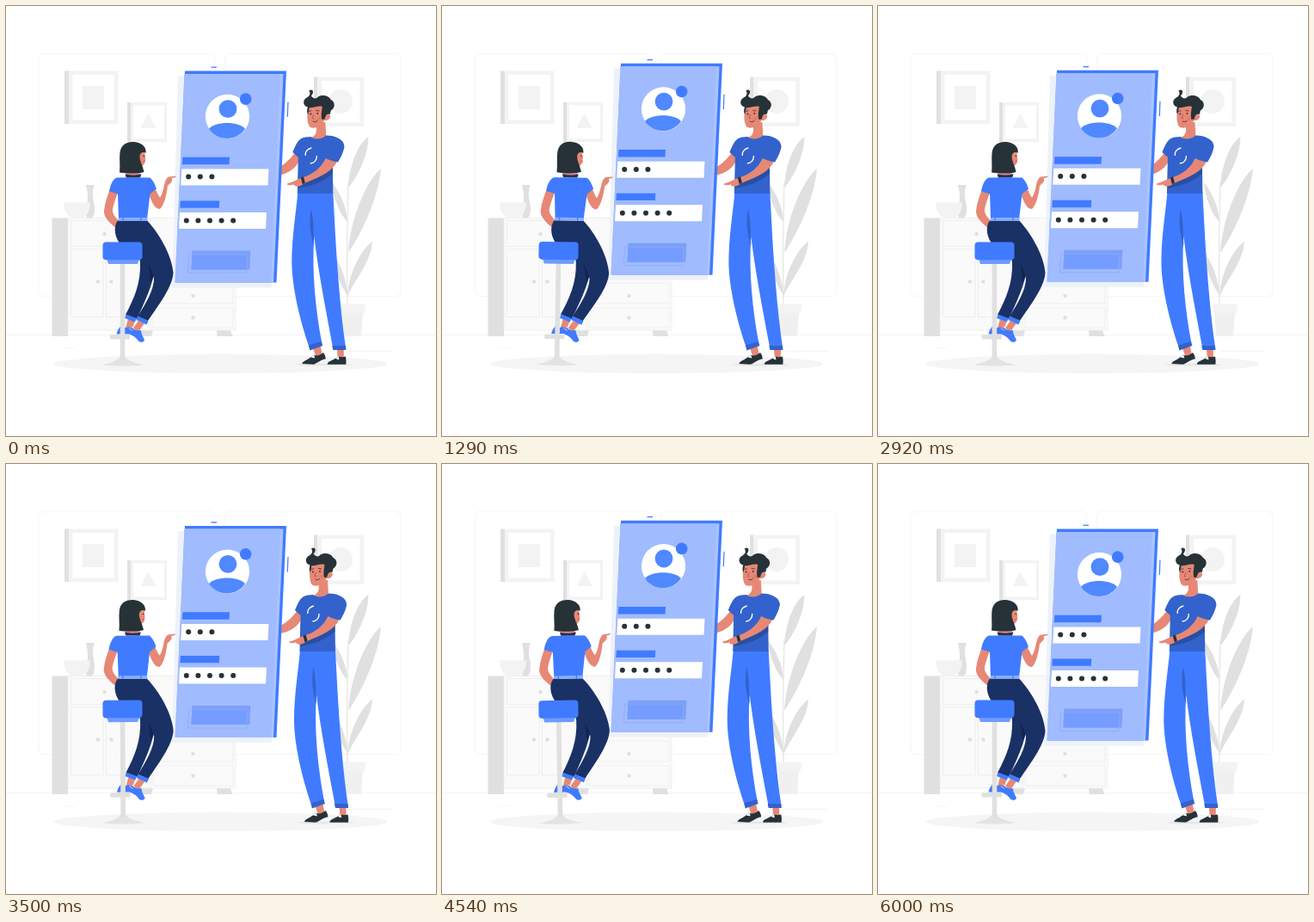
Recreate the animation shown at these times as an HTML page. Size 500 px wide and 500 px high, loop 6040 ms.

```html
<!DOCTYPE html>
<html lang="en">
<head>
<meta charset="utf-8">
<title>Login illustration</title>
<style>
  html, body { margin: 0; width: 100%; height: 100%; overflow: hidden; background: #fff; }
  svg { display: block; width: 100vw; height: 100vh; }
  .blue { fill: #407bff; }
  .deep { fill: #3362cc; }
  .navy { fill: #1a3166; }
  .ink { fill: #263238; }
  .skin { fill: #e68875; }
  .g1 { fill: #fafafa; }
  .g2 { fill: #f3f3f3; }
  .g3 { fill: #e0e0e0; }
  .white { fill: #fff; }
  .line { fill: none; stroke: #ebebeb; stroke-width: .8; }
  .thin { fill: none; stroke: #efefef; stroke-width: .6; }
</style>
</head>
<body>
<svg viewBox="0 0 500 500" xmlns="http://www.w3.org/2000/svg">
  <g id="room">
    <rect class="thin" x="38.4" y="55.2" width="204.2" height="282.4" rx="5.5"/>
    <rect class="thin" x="254.6" y="55.2" width="204.2" height="282.4" rx="5.5"/>
    <path class="thin" d="M0 382.5H500M65 398H80M398 401.5H450"/>

    <path class="g3" d="M68 75.500h5v61.500h-5zM141 112h4v46h-4zM358 82.500h4.500v57.500h-4.500z"/>
    <path class="g2" d="M73 75.500h57.500v61.500h-57.500zM145 112h42v46h-42zM362.500 82.500h53.500v57.500h-53.500z"/>
    <path class="white" d="M77.500 80h48.500v52.500h-48.500zM148 115.500h36v39h-36zM367 87h44.500v48.500h-44.500z"/>
    <path class="g2" d="M89 93h25v27h-25zM165.500 125l9 17h-18z"/>
    <circle class="g2" cx="389" cy="111" r="14"/>

    <path class="g1" d="M72 246.500H267V377H72z"/>
    <path class="g3" d="M53.500 246.500H72V384H53.500zM245 377h16l2.500 7h-18zM155 377h16l-2 7h-14z"/>
    <path class="line" d="M72 246.500H267V377H72zM75.500 249.500H155V279.500H75.500zM75.500 283H113V361.500H75.500zM116.500 283H155V361.500H116.500zM171 322H264V346H171zM171 351H264V374H171zM168 246V377"/>
    <g class="g3">
      <circle cx="114.500" cy="265" r="2.2"/><circle cx="107" cy="320.500" r="2.200"/>
      <circle cx="122.500" cy="320.500" r="2.200"/><circle cx="217.500" cy="337" r="2.200"/>
      <circle cx="217.500" cy="362.500" r="2.200"/>
    </g>
    <path class="g3" d="M93 208h9.500C100 218 101 222 102.500 230C104 240 102 246 99 246.500H94C92 240 94 232 95 225C95.500 218 94 213 93 208z"/>
    <path class="g2" d="M67 228.500H98C98 240 92 246.800 86 246.800H79C73 246.800 67 240 67 228.500z"/>

    <path d="M397 348C396 300 397 250 398 205M397 335C390 320 386 305 381 292" fill="none" stroke="#e0e0e0"/>
    <path class="g3" d="M421.500 152C409 160 399 186 398 211C406 203 421 177 421.500 152zM436 189C419 203 400 248 398 287C411 268 433 226 436 189zM426 273.500C412 284 398 312 397 338C404 320 425 298 426 273.500zM379 205C387 215 397 234 397 251C389 243 380 223 379 205zM378 284C387 296 396 316 397 336C388 324 380 303 378 284z"/>
    <path fill="#f0f0f0" d="M391 357h24l-2 27h-20z"/>
    <path class="g2" d="M389 346.500h29.500l-1.500 10.500h-27z"/>
    <ellipse cx="249.500" cy="416" rx="194" ry="11" fill="#f5f5f5"/>
  </g>

  <g id="man">
    <ellipse cx="369" cy="417" rx="33.500" ry="1.300" fill="#e6e6e6"/>
    <path class="skin" d="M336 170L342 178C337 188 329 195 316 197V188C324 184 330 178 336 170z"/>
    <path class="skin" d="M356 396l9-3 2.500 13-7 3zM384.500 398h8v12h-7z"/>
    <path class="ink" d="M344 416C344 413 351 412 357 405.500C361 407.500 365 406 368.500 403C370.500 405 371.500 408 371.300 410.500C366 411 362 415.500 357 416.800zM373.500 416C374 413 380 412.500 386 407.500C389 408.500 392 408.500 394.500 407.500C395.500 411 395.300 414 395 416.800H373.500z"/>
    <path class="white" d="M354 408.500l3.500-3.500 1.500 4.500zM383 410l3.500-3 .5 4.500z"/>
    <path class="blue" d="M339 216.500H380C382 250 385 330 395 398.500H380C371 350 363 310 358 268C355 310 360 355 367 392L353 398.500C341 365 332 325 332 297C332 268 337 240 339 216.500z"/>
    <path class="deep" d="M354.500 236C358 250 357 264 358 279C353 265 352 249 354.500 236zM351.500 394.500L366.500 390L368 395L353 400.500zM379 395h15.500l.5 5H380z"/>

    <path class="skin" d="M360 136L371 135L372 151C369 157 358 157 354 153C360 151 362 147 360 136z"/>
    <path class="deep" d="M354 152C359 156 367 155 372 150.500C383 150.500 393 155 393 164C392 170 389 176 386 181L379.500 181L380 218H338.500L339.500 176L333 170C337 161 339 154 348 152.500z"/>
    <path d="M340 206C355 203 370 197 379.500 187V195C368 205 355 209 339.500 212z" fill="#294ea3"/>
    <path d="M348 174C347 170 350 166 355 165M361 174C361.500 179 358 183 353.500 183" fill="none" stroke="#fff" stroke-width="1.300"/>
    <path class="skin" d="M372 176L384.500 181C379 192 367 198 347 206L343 200C356 196 366 189 372 176z"/>
    <path class="skin" d="M345 199.500C338 201 334 205 326.500 206.500C326 208.500 330 209 334 207.500C336 210.500 341 211 346 206.500z"/>
    <path class="ink" d="M342.500 200l3-1.800 2 7-3 2z"/>
    <path class="deep" d="M372 157C386 151 393 157 393 164C391 171 388 177 385.500 181.500C380 181 375 179 370.500 176.500z"/>

    <path class="skin" d="M352 116C349.500 125 349.500 132 351.500 138C353 143 360 142.500 364 139.500C367 137.500 369 135 370 133C374 134 378 130 376.500 127C375 125 372 126 371 128L369 116z"/>
    <path class="ink" d="M352 98.500C356 95.500 359 100 354.500 104.500C357 107.500 360 108.500 362 106C367 102.500 375 104 377.500 109C382.500 111 383 118.500 377.500 121.500L376.500 126C373 125 371 127 370.500 131.500L367 132C365.500 127 367 122 367.500 117C362 115.500 358 119 352.500 118L351 126C349 123 350 120 350.500 117.500C345 116.500 344 109 349.500 106.500C351.500 105.500 355 102.500 352 98.500z"/>
    <g class="ink"><circle cx="354" cy="125.500" r=".9"/><circle cx="362" cy="125" r=".9"/></g>
    <path d="M352 122.500l3-.8M360 121.500l4 .5M356.500 134c2 1.200 4 .8 5.500-1" fill="none" stroke="#263238" stroke-width=".8"/>
    <path d="M357.500 126l-1.800 4.500 2 .3" fill="none" stroke="#b3493b" stroke-width=".8"/>
    <circle cx="364" cy="131" r="2" fill="#de7460" opacity=".6"/>
  </g>

  <g id="phone">
    <path d="M200 81H320L309 327H193z" fill="#edf2fa"/>
    <path class="blue" d="M208 75H326L314.500 321H197z"/>
    <path fill="#aac3ff" d="M207.500 78.500H322.500L311 321H196.500z"/>
    <path fill="#a0bbfe" d="M207.500 78.500H319L308 321H196.500z"/>
    <path d="M238.500 70.800H245" stroke="#407bff" stroke-width="1.300"/>
    <path d="M328 111L327.300 128.500" stroke="#407bff" stroke-width="1.200"/>
    <circle class="white" cx="257.500" cy="128" r="25.600"/>
    <g fill="#5088ff">
      <circle cx="258" cy="119.300" r="10.400"/>
      <path d="M236 142.300C243 133.300 271 133.300 278 142.300C268 157.300 246 157.300 236 142.300z"/>
    </g>
    <circle class="blue" cx="278.700" cy="107.700" r="6.800"/>
    <path class="blue" d="M205.300 175.300H260L259.500 183.800H204.800zM202.800 226H248.300L247.800 234.300H202.300z"/>
    <path class="white" d="M204.300 189H305.500L304.500 208H203.300zM202 239.500H303L302 258.500H201z"/>
    <g id="dots" class="ink"></g>
    <path fill="#7c9ff8" d="M216.500 284H284.300L283.300 306H215.500z"/>
    <path fill="#759dff" d="M216.300 288.500H280.800L280 306H215.500z"/>
    <path d="M212.500 288.500H281L280 310H211.500z" fill="none" stroke="#8dabf5" stroke-width=".8"/>
  </g>

  <g id="woman">
    <path fill="#e3e3e3" d="M111 417C124 415.500 130 411 132.500 408H138.500C141 411.500 148 415.500 161 417C150 419 120 419 111 417z"/>
    <path class="skin" d="M143 360l8 3-5 14-7-2zM154 366l7 3-8 11-6-4z"/>
    <path class="blue" d="M128.500 381.500C129 378 131 375 133 372.500C137 374 140 374.500 143 373L146 380C142 382.500 136 381 133 381.500zM141 377C143 374 145 373.500 147 374C149 377.500 153 378 157 377C157 382 160 385 161 388.500C160 391.500 156 391.500 154 389.500C151 385 146 382 141 381z"/>
    <path d="M143 374.500l4 3M145.500 373l4 3" stroke="#fff" stroke-width=".7"/>
    <path class="skin" d="M120.500 214L130 217C127 226 123.500 234 124 239C125 244 129 247 131 250L128 258C121 253 113 245 114 238C115 229 118 221 120.500 214z"/>
    <path class="navy" d="M152 275L172 290C176 305 171 325 152 364L139 359C149 340 157 322 156 298z"/>
    <path fill="#12244f" d="M163 288L174 292C175 304 173 314 168 321C167 310 166 300 163 288z"/>
    <path class="navy" d="M130 249.500H164C178 264 193 290 194.500 310C194 326 178 347 165 366L153 361C163 345 172 330 172 317C170 306 164 297 153 288L133 277C127 270 124 257 130 249.500z"/>
    <path class="blue" d="M139.500 358.500L151.500 363L150 367.500L138 363zM153 360.500L165.500 366L163.500 370.500L151.500 365z"/>
    <path class="g3" d="M132.700 298h5.600V411h-5.600zM121.500 382h22.500v5.500H121.500q-2-2.700 0-5.500z"/>
    <path fill="#6f9cff" d="M117 294H155L153 300H119z"/>
    <rect class="blue" x="112.500" y="274.500" width="46" height="20.700" rx="4"/>

    <path class="skin" d="M165 214L173 211C175 216 177 220 179 223C182 218 183 213 184 208C185 203 187 199 190 198.500L197.500 197.800C198 199.300 195 199.800 192.500 200.300C195 204 190 207 188 209C187 218 184 232 179 236C173 237 168 226 165 214z"/>
    <path class="skin" d="M140 186H157L156 199H139z"/>
    <path class="blue" d="M129 199.500H167C171 202 173.500 208 175 212.500L167.500 218.500L164 248H131L130 218.500L120 215.500C121 209 124 201 129 199.500z"/>
    <path class="navy" d="M138.500 195.500C144 197 152 197 157.500 195.500L156 199.500H140z"/>
    <path fill="#87adff" d="M131 246h33.500v3.700H130.500z"/>
    <path d="M136 246v3.700M157 246v3.700" stroke="#407bff" stroke-width="1.200"/>
    <path class="skin" d="M153 169L161 169C161.500 173 162.500 176 162 179C162 183 160 186 155 187z"/>
    <path class="ink" d="M132.500 170C134 160 142 157.500 149 158C157 158.500 164 164 162.500 171C159 168.500 156 171 155.500 174C155 180 159 185 160.500 193C155 195 140 195 132 193.500C133 186 131.500 178 132.500 170z"/>
    <circle class="ink" cx="160.200" cy="174.500" r=".8"/>
    <path d="M159.500 181l2-.5" stroke="#b3493b" stroke-width=".8"/>
  </g>
</svg>
<script>
  const LOOP = 6040, FPS = 24;
  const el = id => document.getElementById(id);
  const man = el('man'), phone = el('phone'), woman = el('woman');

  const dotRow = (count, x, y) => Array.from({ length: count }, (_, i) =>
    `<circle cx="${x + i * 13.6}" cy="${y}" r="3"/>`).join('');
  el('dots').innerHTML = dotRow(3, 212.2, 198.1) + dotRow(5, 209.8, 249);

  // Piecewise linear track over [position, value] stops.
  function track(stops, p) {
    const i = Math.max(1, stops.findIndex(s => s[0] >= p));
    const [p0, v0] = stops[i - 1], [p1, v1] = stops[i];
    return v0 + (v1 - v0) * (p - p0) / (p1 - p0);
  }

  const float = [[0, .4], [.5, -9.6], [1, .4]];
  const sway = [[0, 0], [.25, 1], [.75, -1], [1, 0]];
  const shake = [0, -1, 2, -4, 4, -4, 4, -4, 2, -1, 0].map((v, i) => [i / 10, v + .3]);

  function draw(ms) {
    const seconds = Math.floor((ms % LOOP + 5) * FPS / 1000) / FPS;
    const p = seconds % 6 / 6;
    phone.setAttribute('transform', `translate(0 ${track(float, p * 2 % 1)})`);
    woman.setAttribute('transform', `rotate(${track(sway, p)} 154 287.5)`);
    man.setAttribute('transform', `translate(${track(shake, p)} 0)`);
  }

  const start = performance.now();
  function tick() {
    draw(performance.now() - start);
    requestAnimationFrame(tick);
  }
  tick();
</script>
</body>
</html>
```
